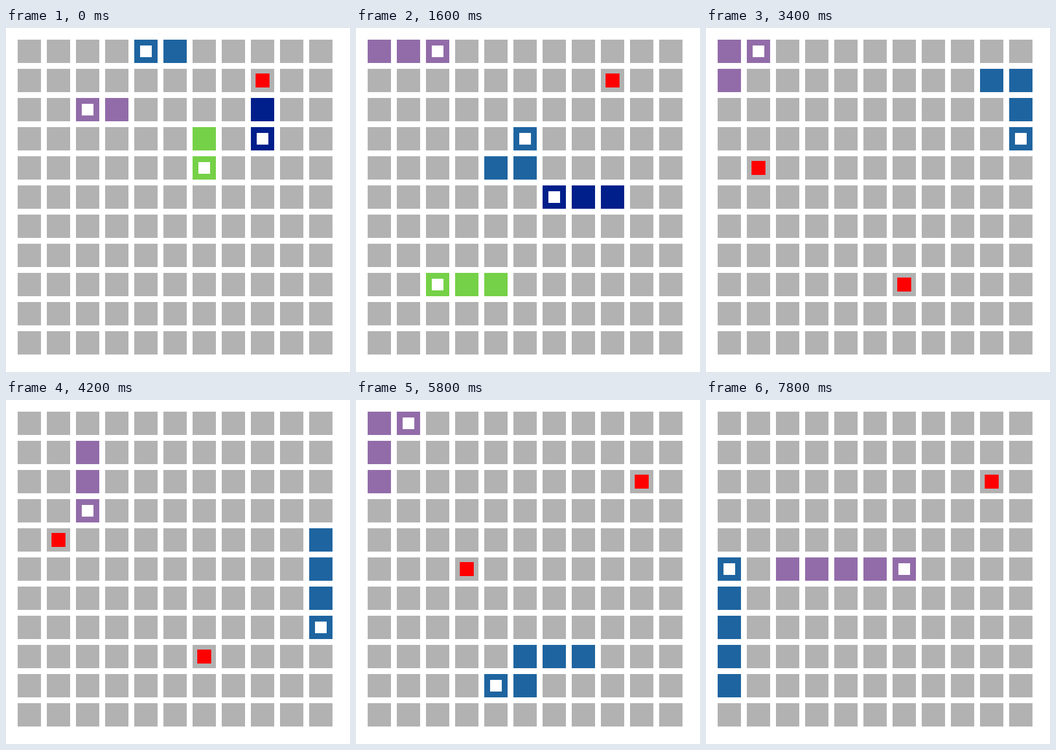
Animation, 590 px wide and 590 px high, one loop 8000 ms. Source, as an HTML page with a canvas:

```html
<!DOCTYPE html>
<html lang="en">
<head>
<meta charset="utf-8">
<title>Snakes on a grid</title>
<style>
  html, body { margin: 0; width: 100%; height: 100%; overflow: hidden; background: #fff; }
  canvas { display: block; }
</style>
</head>
<body>
<canvas id="board" width="590" height="590"></canvas>
<script>
const TURN_MS = 200, TURNS = 40, SIZE = 11, START_LENGTH = 3;
const STEP = { L: [-1, 0], R: [1, 0], U: [0, -1], D: [0, 1] };

// Moves are direction + run length; a snake disappears when its moves run out.
// meals: turns on which it eats, growing one turn later.
const snakes = [
  { color: '#1e64a0', start: [5, 0], meals: [13, 26],
    moves: 'L2 D4 R2 U2 R3 U1 R2 D7 L5 D1 L2 D1 L1 U1 L2 U4' },
  { color: '#926ca9', start: [3, 2], meals: [23, 36],
    moves: 'L1 D1 L2 U3 R2 D3 L2 U3 R2 D4 L2 U4 R2 D5 R4' },
  { color: '#75d147', start: [6, 3], meals: [], moves: 'D5 L6' },
  { color: '#001f8b', start: [8, 2], meals: [], moves: 'D1 R2 D2 L4 U2' },
];

const foods = [
  { cell: [8, 1], from: 0, to: 13 },
  { cell: [1, 4], from: 13, to: 23 },
  { cell: [6, 8], from: 16, to: 26 },
  { cell: [9, 2], from: 24, to: TURNS },
  { cell: [3, 5], from: 29, to: 36 },
];

function tracePath({ start, moves }) {
  const path = [start];
  for (const [dir, ...count] of moves.split(' ')) {
    const [dx, dy] = STEP[dir];
    for (let n = +count.join(''); n > 0; n--) {
      const [x, y] = path[path.length - 1];
      path.push([x + dx, y + dy]);
    }
  }
  return path;
}
for (const snake of snakes) snake.path = tracePath(snake);

const ctx = document.getElementById('board').getContext('2d');

function square([col, row], size, color) {
  const inset = (40 - size) / 2;
  ctx.fillStyle = color;
  ctx.fillRect(20 + col * 50 + inset, 20 + row * 50 + inset, size, size);
}

function drawSnake({ color, path, meals }, turn) {
  const head = turn + 1;
  if (head >= path.length) return;
  const length = START_LENGTH + meals.filter(meal => meal < turn).length;
  const body = path.slice(Math.max(0, head + 1 - length), head + 1);
  for (const cell of body) square(cell, 40, color);
  square(path[head], 20, '#fff');
}

function draw(turn) {
  ctx.fillStyle = '#fff';
  ctx.fillRect(0, 0, 590, 590);
  for (let row = 0; row < SIZE; row++)
    for (let col = 0; col < SIZE; col++) square([col, row], 40, '#b2b2b2');
  for (const { cell, from, to } of foods)
    if (turn >= from && turn < to) square(cell, 24, '#f00');
  for (const snake of snakes) drawSnake(snake, turn);
}

const startTime = performance.now();
function tick() {
  const elapsed = Math.max(0, performance.now() - startTime);
  draw(Math.floor(elapsed / TURN_MS) % TURNS);
  requestAnimationFrame(tick);
}
tick();
</script>
</body>
</html>
```
